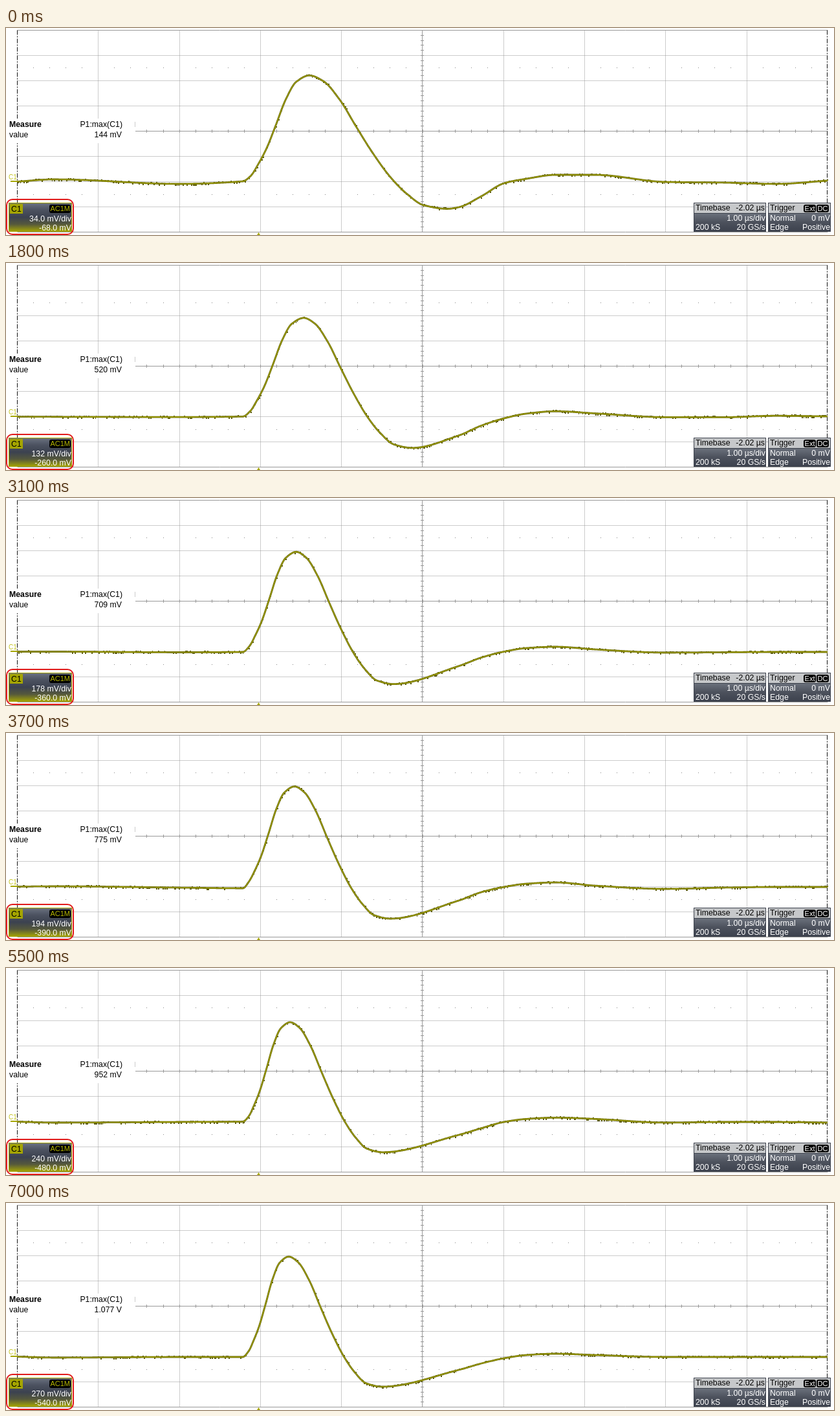
Write an HTML page with a canvas that moves like this. It is 1280 by 320 pixels and loops after 7100 ms.

```html
<!DOCTYPE html>
<html lang="en">
<head>
<meta charset="utf-8">
<title>Oscilloscope pulse</title>
<style>
html, body { margin: 0; width: 100%; height: 100%; overflow: hidden; background: #fff; }
canvas { display: block; }
</style>
</head>
<body>
<canvas id="scope" width="1280" height="320"></canvas>
<script>
const ctx = document.getElementById('scope').getContext('2d');
const STEPS = 71, STEP_MS = 100;
const LEFT = 17, RIGHT = 1270, TOP = 3, BOTTOM = 315, MID_X = 643, MID_Y = 159;
const DIV_X = 125.3, DIV_Y = 39, ZERO = 237;

// step, max mV, mV/div, peak x, dip x, dip y, three baseline heights, ten tail heights
const KEYS = [
  [0, 144, 34, 469, 682, 279.5, 234, 241, 237, 277, 260, 240, 233, 227, 227, 238, 239, 241, 236],
  [10, 368, 92, 468, 659, 282, 237, 238.5, 239, 274, 256, 244, 235, 229.5, 233, 240, 239, 234, 236],
  [25, 633, 160, 452, 606, 288, 238, 238, 236, 261, 248, 237, 231, 229, 232, 237, 238, 238, 238],
  [37, 775, 194, 446, 594, 287, 237, 239, 240, 259, 246, 238, 233, 231, 236, 241, 239, 238, 238],
  [48, 890, 220, 441, 587, 286, 239, 237, 237, 258, 247, 238, 233, 231, 233, 239, 238, 238, 239],
  [62, 1010, 255, 438, 580, 284, 239, 239, 238, 258, 248, 238, 234, 232, 234, 239, 238, 238, 239],
  [70, 1077, 270, 437, 581, 284, 239, 238, 238, 258, 248, 240, 235, 233, 235, 238, 238, 238, 238]
];
const HEAD_X = [75, 267, 366];
const TAIL_X = [700, 735, 770, 805, 850, 910, 1020, 1110, 1190, 1270];
const RISE = [[.1, .05], [.22, .165], [.34, .305], [.48, .52], [.64, .775], [.8, .94], [1, 1]];
const FALL = [[.1, .042], [.22, .182], [.34, .385], [.46, .582], [.59, .765], [.71, .89], [.83, .973], [1, 1]];

// Monotone cubic through the given points
function spline(xs, ys) {
  const d = xs.slice(1).map((x, i) => (ys[i + 1] - ys[i]) / (x - xs[i]));
  const m = xs.map((_, i) => {
    if (i === 0) return d[0];
    if (i === d.length) return d[i - 1];
    const a = d[i - 1], b = d[i];
    return a * b > 0 ? 2 * a * b / (a + b) : 0;
  });
  return x => {
    let i = 0;
    while (i < d.length - 1 && x > xs[i + 1]) i++;
    const h = xs[i + 1] - xs[i], t = (x - xs[i]) / h, s = 1 - t;
    return ys[i] * (1 + 2 * t) * s * s + m[i] * h * t * s * s
      + ys[i + 1] * t * t * (3 - 2 * t) - m[i + 1] * h * t * t * s;
  };
}

const keySteps = KEYS.map(k => k[0]);
const tracks = KEYS[0].map((_, c) => spline(keySteps, KEYS.map(k => k[c])));

function seeded(seed) {
  return () => {
    seed = (seed * 1664525 + 1013904223) >>> 0;
    return seed / 4294967296;
  };
}

function line(x1, y1, x2, y2, color, dash = []) {
  ctx.strokeStyle = color;
  ctx.lineWidth = 1;
  ctx.setLineDash(dash);
  ctx.beginPath();
  ctx.moveTo(x1 + .5, y1 + .5);
  ctx.lineTo(x2 + .5, y2 + .5);
  ctx.stroke();
  ctx.setLineDash([]);
}

function rect(x, y, w, h, color) {
  ctx.fillStyle = color;
  ctx.fillRect(x, y, w, h);
}

function pill(x, y, w, h, color, radius) {
  ctx.fillStyle = color;
  ctx.beginPath();
  ctx.roundRect(x, y, w, h, radius);
  ctx.fill();
}

function text(str, x, y, color = '#000', align = 'left', font = '12.3px') {
  ctx.font = font + ' "Liberation Sans", Arial, sans-serif';
  ctx.fillStyle = color;
  ctx.textAlign = align;
  ctx.fillText(str, x, y);
}

function shade(y1, y2, ...colors) {
  const g = ctx.createLinearGradient(0, y1, 0, y2);
  colors.forEach((c, i) => g.addColorStop(i / (colors.length - 1), c));
  return g;
}

function drawGrid() {
  for (let i = 1; i < 10; i++) {
    const x = Math.round(LEFT + i * DIV_X);
    if (i !== 5) line(x, TOP, x, BOTTOM, '#999', [1, 1]);
  }
  for (let i = 1; i < 8; i++) {
    const y = TOP + i * DIV_Y;
    if (i !== 4) line(LEFT, y, RIGHT, y, '#999', [1, 1]);
  }
  for (const y of [TOP, MID_Y, BOTTOM]) line(LEFT, y, RIGHT, y, '#999');
  line(MID_X, TOP, MID_X, BOTTOM, '#999');
  for (let i = 1; i < 50; i++) {
    const x = Math.round(LEFT + i * DIV_X / 5);
    rect(x, MID_Y - 2, 1, 5, '#999');
    if (i % 5) for (const y of [61, 257]) rect(x, y, 1, 1, '#888');
  }
  for (let i = 1; i < 40; i++) rect(MID_X - 2, Math.round(TOP + i * DIV_Y / 5), 5, 1, '#999');
  for (const x of [LEFT, RIGHT - 1]) line(x, TOP, x, BOTTOM, '#111', [7, 2, 2, 2]);
}

function drawMeasure(mv) {
  rect(0, 140, 200, 38, '#fff');
  rect(199, 145, 1, 8, '#ccc');
  text('Measure', 5, 153, '#000', 'left', 'bold 12.3px');
  text('P1:max(C1)', 180, 153, '#000', 'right');
  text('value', 5, 169);
  const label = mv < 1000 ? Math.round(mv) + ' mV' : (mv / 1000).toFixed(3) + ' V';
  text(label, 179, 169, '#000', 'right');
}

function drawTrace(n, key, scale) {
  const [, mv, , peakX, dipX, dipY] = key;
  const peakY = 238.5 - mv / scale * DIV_Y;
  const points = [[LEFT, ZERO + .5]];
  HEAD_X.forEach((x, i) => points.push([x, key[6 + i]]));
  for (const [u, v] of RISE) points.push([368 + u * (peakX - 368), ZERO + v * (peakY - ZERO)]);
  for (const [u, v] of FALL) points.push([peakX + u * (dipX - peakX), peakY + v * (dipY - peakY)]);
  TAIL_X.forEach((x, i) => points.push([x, key[9 + i]]));
  const wave = spline(points.map(p => p[0]), points.map(p => p[1]));
  const random = seeded(n * 7919 + 17);

  // Short bursts of noise on either edge
  for (let x = LEFT; x < RIGHT;) {
    const w = 1 + Math.floor(random() * 4);
    const y = Math.round(wave(x));
    if (random() < .55) rect(x, y + (random() < .5 ? -2 : 1), Math.min(w, 2), 2, '#5b5b0a');
    x += w;
  }
  ctx.beginPath();
  for (let x = LEFT; x <= RIGHT; x++) ctx.lineTo(x, wave(x));
  ctx.lineJoin = 'round';
  for (const [width, color] of [[2.8, '#62620a'], [1.6, '#999900']]) {
    ctx.lineWidth = width;
    ctx.strokeStyle = color;
    ctx.stroke();
  }
}

function drawChannel(scale) {
  text('C1', 4, 234, '#c4c420', 'left', '10px');
  rect(7, 236, 11, 2, '#a5a500');
  ctx.fillStyle = '#a5a500';
  ctx.beginPath();
  ctx.moveTo(390.5, 316);
  ctx.lineTo(393, 320);
  ctx.lineTo(388, 320);
  ctx.fill();

  rect(4, 270, 98, 45, '#a5a500');
  rect(5, 271, 96, 43, shade(271, 314, '#697080', '#4b515f', '#3c4250', '#55583c', '#a0a008'));
  rect(6, 272, 20, 15, '#a5a500');
  text('C1', 8, 284);
  pill(67, 273, 33, 13, '#000', 3);
  text('AC1M', 99, 283, '#b8b800', 'right', '11px');
  const offset = scale < 100 ? scale * 2 : Math.round(scale / 5) * 10;
  text((scale < 50 ? scale.toFixed(1) : scale) + ' mV/div', 101, 299, '#fff', 'right');
  text('-' + offset.toFixed(1) + ' mV', 101, 313, '#fff', 'right');

  ctx.strokeStyle = '#e11b1b';
  ctx.lineWidth = 2;
  ctx.beginPath();
  ctx.roundRect(1, 265, 103, 54, 9);
  ctx.stroke();
}

function drawPanel(x, w, title) {
  rect(x, 270, w, 45, '#3d424d');
  rect(x + 1, 271, w - 2, 15, '#c6c8ca');
  rect(x + 1, 287, w - 2, 27, shade(287, 314, '#6a707b', '#4c515c', '#3d424e'));
  text(title, x + 3, 282);
}

function drawPanels() {
  drawPanel(1063, 112, 'Timebase');
  text('-2.02 µs', 1173, 282, '#000', 'right');
  text('1.00 µs/div', 1174, 298, '#fff', 'right');
  text('200 kS', 1066, 312, '#fff');
  text('20 GS/s', 1174, 312, '#fff', 'right');

  drawPanel(1178, 97, 'Trigger');
  pill(1233, 273, 19, 12, '#000', 3);
  pill(1253, 273, 19, 12, '#000', 3);
  text('Ext', 1242.5, 283, '#fff', 'center', '11px');
  text('DC', 1262.5, 283, '#fff', 'center', '11px');
  text('Normal', 1181, 298, '#fff');
  text('0 mV', 1274, 298, '#fff', 'right');
  text('Edge', 1181, 312, '#fff');
  text('Positive', 1274, 312, '#fff', 'right');
}

function draw() {
  const n = Math.floor(performance.now() / STEP_MS) % STEPS;
  const key = tracks.map(track => track(n));
  const step = key[2] < 200 ? 2 : 5;
  const scale = Math.round(key[2] / step) * step;
  rect(0, 0, 1280, 320, '#fff');
  drawGrid();
  drawMeasure(key[1]);
  drawTrace(n, key, scale);
  drawChannel(scale);
  drawPanels();
  requestAnimationFrame(draw);
}
draw();
</script>
</body>
</html>
```
